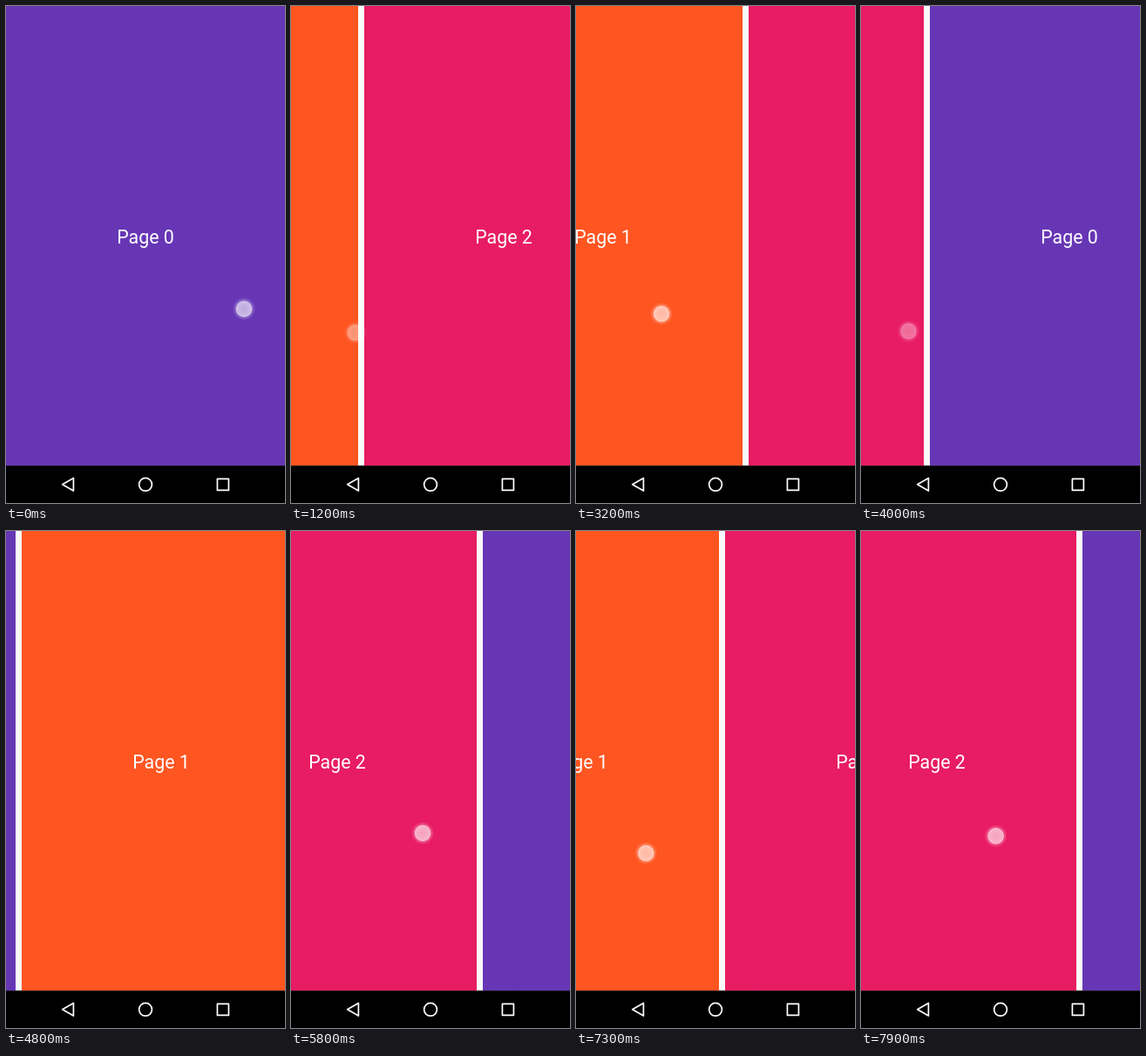
Animation, 320 px wide and 569 px high, one loop 8000 ms. Source, as an HTML page with a canvas:

```html
<!DOCTYPE html>
<html lang="en">
<head>
<meta charset="utf-8">
<title>Looping pager</title>
<style>
  html, body { margin: 0; width: 100%; height: 100%; overflow: hidden; background: #000; }
  canvas { display: block; width: 320px; height: 569px; }
</style>
</head>
<body>
<canvas></canvas>
<script>
const W = 320, H = 569, NAV = 526.33, GAP = 7, PITCH = W + GAP, LOOP = 8000;
const COLORS = ['#6736b5', '#ff5521', '#e81c63'];

// One swipe, in ms: finger rests, pulls the page, lets go, page settles
const LEAD = 80, HOLD = 60, RELEASE = 260, SETTLE = 400, PULL = 180;
const LAST = 11;

// Pace of the swipes: [swipe, start time], evenly spaced in between
const PACE = [[0, 40], [1, 899], [4, 2986], [6, 4403], [8, 5607], [10, 7062], [LAST, 7741]];

const canvas = document.querySelector('canvas');
const ctx = canvas.getContext('2d');
const scale = window.devicePixelRatio || 1;
canvas.width = W * scale;
canvas.height = H * scale;
ctx.scale(scale, scale);

const clamp = v => Math.min(1, Math.max(0, v));

function startOf(i) {
  const k = Math.max(1, PACE.findIndex(([swipe]) => swipe >= i));
  const [[i0, t0], [i1, t1]] = [PACE[k - 1], PACE[k]];
  return t0 + (t1 - t0) * (i - i0) / (i1 - i0);
}

// Distance the finger has pulled the page after u ms
const pulled = u => PULL * clamp((u - HOLD) / (RELEASE - HOLD)) ** 1.3;

function travel(u) {
  const settle = 1 - (1 - clamp((u - RELEASE) / SETTLE)) ** 5;
  return pulled(u) + (PITCH - PULL) * settle;
}

function drawPages(scroll) {
  ctx.fillStyle = '#fafafa';
  ctx.fillRect(0, 0, W, NAV);
  ctx.font = '21.33px Roboto, sans-serif';
  ctx.textAlign = 'center';
  const first = Math.floor(scroll / PITCH);
  for (let i = first; i <= first + 1; i++) {
    const x = i * PITCH - scroll;
    ctx.fillStyle = COLORS[i % 3];
    ctx.fillRect(x, 0, W, NAV);
    ctx.fillStyle = '#fff';
    ctx.fillText('Page ' + i % 3, x + W / 2, 272);
  }
}

// The place where the finger lands drifts a little from swipe to swipe
function drawTouch(i, u) {
  const alpha = clamp((u + LEAD) / 40) * (1 - clamp((u - RELEASE) / 110));
  if (!alpha) return;
  const d = pulled(u);
  const slop = 14 * (1 - clamp(u / HOLD));
  const x = 243 + 16 * Math.cos(0.83 * i) + slop - d;
  const y = 346 + 8 * Math.sin(1.42 * i + 0.1) + 20 * (d / PULL) ** 2;
  ctx.save();
  ctx.globalAlpha = alpha;
  ctx.translate(x, y);
  const glow = ctx.createRadialGradient(0, 0, 0, 0, 0, 13);
  [[0, .58], [.55, .65], [.67, .7], [.74, .26], [.86, .14], [1, 0]]
    .forEach(([at, a]) => glow.addColorStop(at, `rgba(255,255,255,${a})`));
  ctx.fillStyle = glow;
  ctx.fillRect(-13, -13, 26, 26);
  ctx.restore();
}

function drawNav() {
  ctx.fillStyle = '#000';
  ctx.fillRect(0, NAV, W, H - NAV);
  ctx.strokeStyle = '#fff';
  ctx.lineWidth = 1.7;
  ctx.lineJoin = 'round';
  ctx.beginPath();
  ctx.moveTo(64.7, 547.8);
  ctx.lineTo(77.4, 540.5);
  ctx.lineTo(77.4, 555.1);
  ctx.closePath();
  ctx.moveTo(167.4, 547.8);
  ctx.arc(160, 547.8, 7.4, 0, Math.PI * 2);
  ctx.rect(242.4, 541.4, 13, 13);
  ctx.stroke();
}

function frame(now) {
  const t = now % LOOP;
  let i = LAST;
  while (i > 0 && startOf(i) - LEAD > t) i--;
  const u = t - startOf(i);
  drawPages(Math.round(i * PITCH + travel(u)));
  drawTouch(i, u);
  drawNav();
  requestAnimationFrame(frame);
}
requestAnimationFrame(frame);
</script>
</body>
</html>
```
